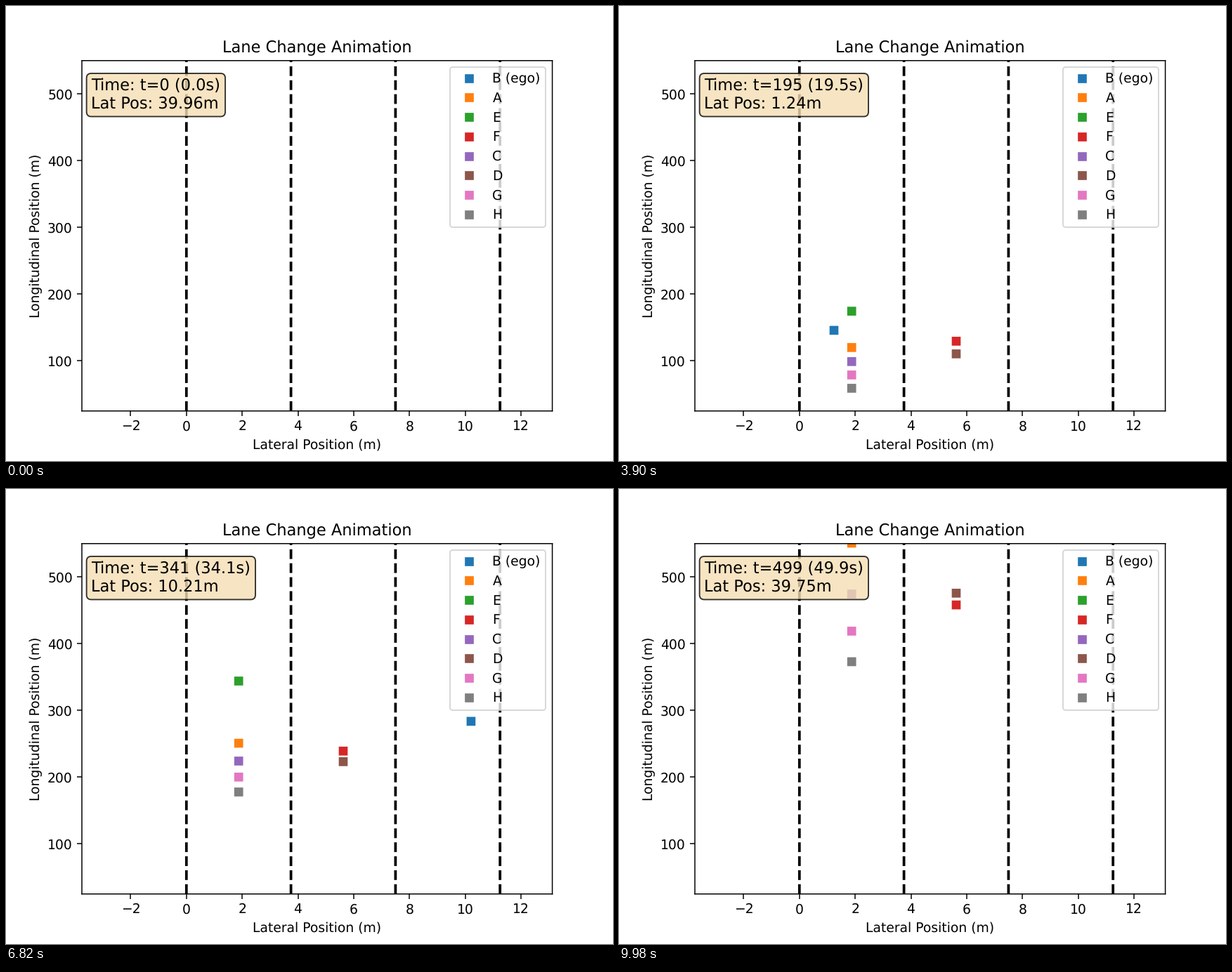
A matplotlib script for the animation above (10 s loop, 864 by 648 pixels).

```python
import numpy as np
import matplotlib.pyplot as plt
from matplotlib.animation import FuncAnimation

FRAMES = 500
STEP_MS = 20
LANE = 3.75
MARKER = dict(marker="s", s=6.76 ** 2, linewidths=0, snap=False)

plt.rcParams["text.hinting"] = "none"

# name: lane, start (m), cruise speed (m/s), onset of speeding up (s), its rate
CARS = {
    "B (ego)": (0, -18, 8.4, 27.5, 0.35),
    "A": (0, -34, 7.9, 27.8, 0.39),
    "E": (0, -1, 9.0, 23.6, 0.346),
    "F": (1, 32, 5.0, 20.9, 0.21),
    "C": (0, -57, 8.0, 28.8, 0.297),
    "D": (1, -4.5, 5.9, 24.5, 0.288),
    "G": (0, -79, 8.1, 30.7, 0.254),
    "H": (0, -98, 8.05, 31.6, 0.207),
}
COLORS = [f"C{i}" for i in range(len(CARS))]
lane, start, cruise, onset, rate = np.array(list(CARS.values())).T

# the ego car sways in its lane, then drifts off the road
SWAY_S = np.array([0, 12.5, 19.5, 25.5, 30.6, 34.1, 42.8, 50])
SWAY_M = np.array([LANE / 2, 2.70, 1.24, 3.22, 5.65, 10.21, 25.06, 39.96])
SLOPE = np.gradient(SWAY_M, SWAY_S)


def ego_lateral(sec):
    """Cubic Hermite curve through the sway points."""
    i = min(np.searchsorted(SWAY_S, sec, side="right"), len(SWAY_S) - 1) - 1
    h = SWAY_S[i + 1] - SWAY_S[i]
    u = (sec - SWAY_S[i]) / h
    ease = u * u * (3 - 2 * u)
    return ((1 - ease) * SWAY_M[i] + ease * SWAY_M[i + 1]
            + h * u * (1 - u) * ((1 - u) * SLOPE[i] - u * SLOPE[i + 1]))


def positions(sec):
    """Cruise at constant speed, then accelerate evenly."""
    x = (lane + 0.5) * LANE
    x[0] = ego_lateral(sec)
    y = start + cruise * sec + rate * np.maximum(sec - onset, 0) ** 2
    return np.column_stack([x, y])


fig, ax = plt.subplots(figsize=(6.4, 4.8), dpi=135)
ax.set_xlim(-LANE, 3.5 * LANE)
ax.set_ylim(25, 550)
ax.set_xticks(range(-2, 13, 2))
ax.set_yticks(range(100, 501, 100))
ax.set_xlabel("Lateral Position (m)")
ax.set_ylabel("Longitudinal Position (m)")
ax.set_title("Lane Change Animation")
for spine in ax.spines.values():
    spine.set_snap(False)

for k in range(4):
    ax.axvline(k * LANE, color="k", ls="--", lw=2, snap=False)

dots = ax.scatter(*positions(0).T, c=COLORS, zorder=2.1, **MARKER)
keys = [ax.scatter([], [], color=c, label=name, **MARKER)
        for name, c in zip(CARS, COLORS)]
legend = ax.legend(handles=keys, loc="upper right", scatteryoffsets=[0.5])
for handle in legend.legend_handles:
    handle.set_snap(False)

info = ax.text(0.02, 0.95, "", transform=ax.transAxes, fontsize=12, va="top",
               bbox=dict(boxstyle="round", facecolor="wheat", alpha=0.8))


def update(t):
    sec = t / 10
    dots.set_offsets(positions(sec) if t else np.empty((0, 2)))
    # the readout opens on the last recorded value
    lat = ego_lateral(sec if t else FRAMES / 10)
    info.set_text(f"Time: t={t} ({sec:.1f}s)\nLat Pos: {lat:.2f}m")
    return dots, info


anim = FuncAnimation(fig, update, frames=FRAMES, interval=STEP_MS,
                     repeat=True, repeat_delay=0, cache_frame_data=False)
plt.show()
```
